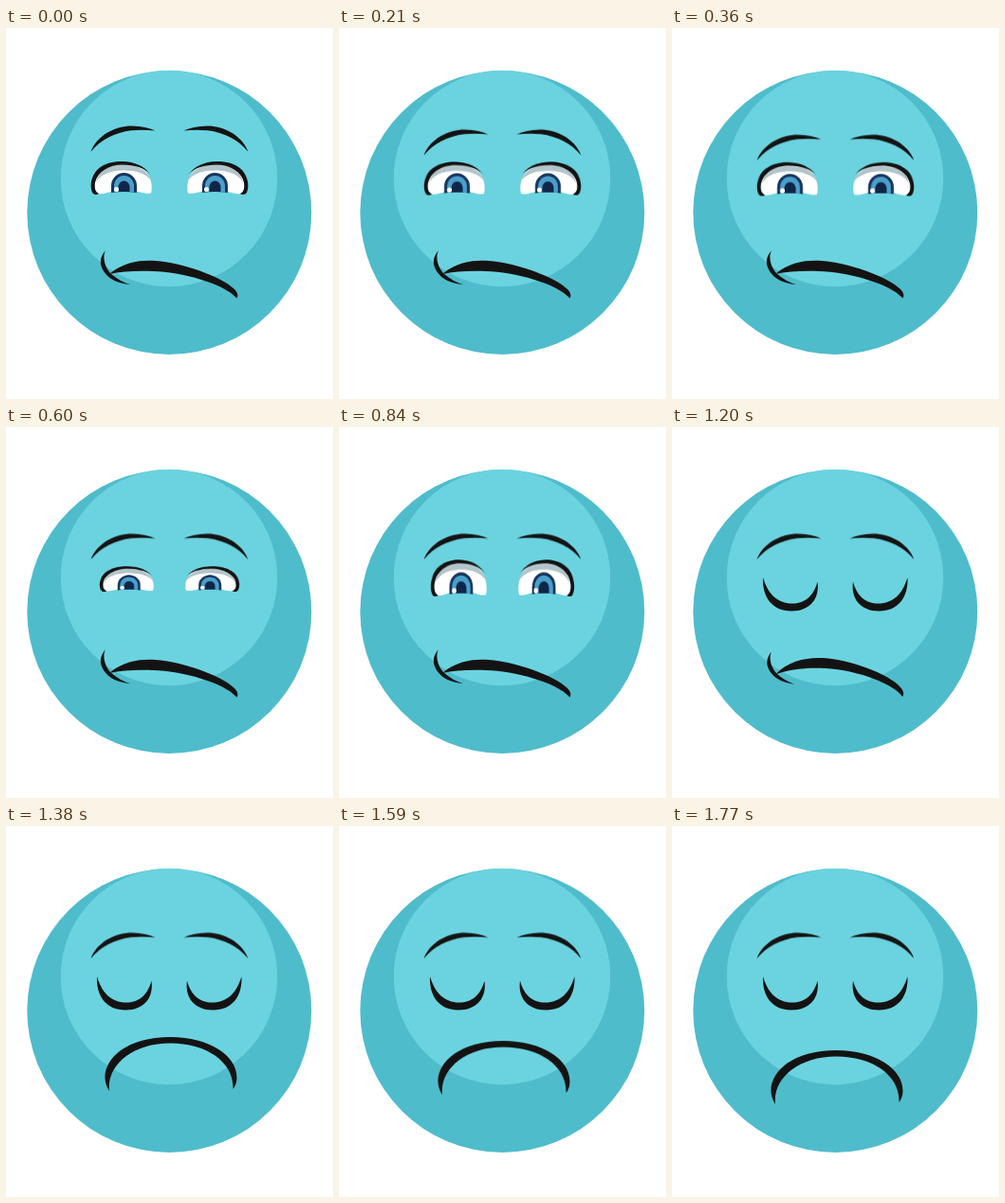
An HTML page without scripts for the animation above (1890 ms loop, 345 by 392 pixels).

```html
<!DOCTYPE html>
<html lang="en">
<head>
<meta charset="utf-8">
<title>Sad face</title>
<style>
html, body { margin: 0; width: 100%; height: 100%; overflow: hidden; background: #fff; }
svg { display: block; width: 345px; height: 392px; }
.ink { fill: #141313; }
.brows, .eye, .open, .closed, .lids, .mouth, .lip, .dimple {
  animation: 1890ms linear infinite;
}
.brows { animation-name: brows; }
.open { animation-name: open; }
.closed { animation-name: closed; }
.eye { animation-name: eye; transform-origin: 154px 176px; }
.lids { animation-name: lids; }
.mouth { animation-name: drop; }
.lip { animation-name: lip; }
.dimple { animation-name: dimple; }

@keyframes brows {
  0%, 4.76% { transform: none; animation-timing-function: ease-in-out; }
  19.05%, 100% { transform: translateY(9.3px); }
}
@keyframes eye {
  0%, 4.76% { transform: translate(0, 0) scale(1, 1); animation-timing-function: ease-in-out; }
  19.05%, 22.22% { transform: translate(0, 1.5px) scale(1, 1.02); }
  31.75%, 33.33% { transform: translate(2px, -2px) scale(.89, .77); }
  44.44% { transform: translate(2px, 3px) scale(.92, 1.11); }
  49%, 100% { transform: translate(2px, 3.5px) scale(.93, 1.17); }
}
@keyframes open {
  0%, 49.1% { visibility: visible; }
  49.11%, 100% { visibility: hidden; }
}
@keyframes closed {
  0%, 49.1% { visibility: hidden; }
  49.11%, 100% { visibility: visible; }
}
@keyframes lids {
  0%, 49.1% { transform: translateY(-8px); }
  53.97% { transform: translateY(-4.7px); animation-timing-function: ease-out; }
  63.49%, 100% { transform: none; }
}
@keyframes lip {
  0%, 62.7% {
    d: path("M109,260 C125,246 145,245 158,246 C185,248 227,262 241,276 C245,280 245,284 243.5,285.5 C230,270 185,257.5 155,257 C138,256.5 122,257 109,260Z");
  }
  73.01%, 100% {
    d: path("M109,280 C94,258 116,223 173.5,223 C215,223 244,243 243.5,266 C243.5,271 242,275 239.5,278 C241,250 212,229.5 173.5,229.5 C133,229.5 106,253 109,280Z");
  }
}
@keyframes dimple {
  0%, 62.7% {
    d: path("M105,235 C101,243 105,254 111,260 C117,265 124,269 131,271 C118,270 108,265 103,257 C98,249 99,242 105,235Z");
    visibility: visible;
  }
  73%, 100% {
    d: path("M106,262 C106,264 106,266 107,268 C107,270 108,274 109,279 C108,276 106,272 106,270 C105,267 105,265 106,262Z");
    visibility: hidden;
  }
}
@keyframes drop {
  0%, 73.02% { transform: none; animation-timing-function: cubic-bezier(.33, 0, .67, .33); }
  93.65%, 100% { transform: translateY(14px); }
}
</style>
</head>
<body>
<svg viewBox="0 0 345 392">
  <defs>
    <path id="brow" d="M89.5,130.7 C96,113 116,103.3 133,103.5 Q148,104 157.5,108.5 Q144,107 132,108.3 C115,110.5 100,118 89.5,130.7Z"/>
    <path id="lid" d="M96,159 C95,180 106,194.5 126,194.5 C146,194.5 156,181 153.5,163.5 C149,180 139,186.5 127,186.5 C111,186.5 101,176 96,159Z"/>
    <g id="ball">
      <path fill="#fff" d="M95,174 C92,166 94,156 103,149 C113,143 133,143 143,148 C152,153 155.5,166 153,174.5 C147,176 142,172.5 137,173 H112 C106,173.5 100,177 95,174Z"/>
      <path fill="#b3c5ca" d="M95,163 C98,150 110,143.5 122,143.5 C137,143.5 150,150 153.8,162 C147,152.5 134,150 122,150.5 C110,151 100,154.5 95,163Z"/>
      <path fill="#17355c" d="M111,174 V167 A13.5,14 0 0 1 138,167 V174 Q124.500,172 111,174Z"/>
      <path fill="#4a9fcb" d="M114,173.500 V167 A10.500,11 0 0 1 135,167 V173.500 Q124.500,172 114,173.500Z"/>
      <path fill="#0e2748" d="M118.500,173 V168 A6,6.500 0 0 1 130.500,168 V173Z"/>
      <path class="ink" d="M92,175 C88,170 89,158 96,150 C104,142.500 114,140.800 123,141 C136,141.500 146,146 152,154 C146,148 136,144.500 123,144.500 C108,144.500 97,152 94,163 C93,169 94,173 98,175 Q95,177 92,175Z"/>
    </g>
  </defs>

  <circle cx="172.3" cy="195" r="150" fill="#4fbccb"/>
  <circle cx="172" cy="159" r="114.300" fill="#6bd3df"/>

  <g class="brows ink">
    <use href="#brow"/>
    <use href="#brow" transform="matrix(-1 0 0 1 345 0)"/>
  </g>

  <g class="open">
    <g class="eye">
      <use href="#ball"/>
      <circle cx="116.500" cy="170.500" r="2.500" fill="#fff"/>
    </g>
    <g transform="matrix(-1 0 0 1 345 0)">
      <g class="eye">
        <use href="#ball"/>
        <circle cx="133.500" cy="170.500" r="2.500" fill="#fff"/>
      </g>
    </g>
  </g>

  <g class="closed ink">
    <g class="lids">
      <use href="#lid"/>
      <use href="#lid" transform="matrix(-1 0 0 1 344.500 0)"/>
    </g>
  </g>

  <g class="mouth ink">
    <path class="dimple"/>
    <path class="lip"/>
  </g>
</svg>
</body>
</html>
```
